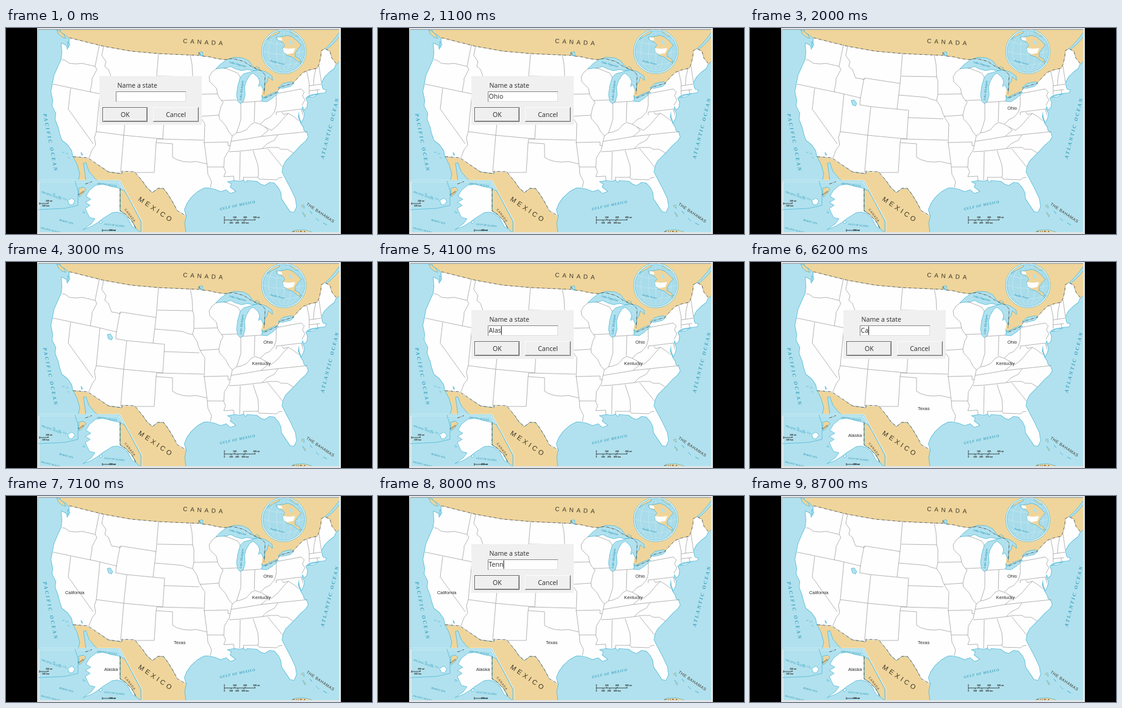
Recreate the animation shown at these times as an HTML page. Size 600x338 px, loop 8.9 s.

```html
<!DOCTYPE html>
<html lang="en">
<head>
<meta charset="utf-8">
<title>Name a state</title>
<style>
  html, body { margin: 0; width: 100%; height: 100%; overflow: hidden; background: #000; }
  svg { display: block; width: 600px; height: 338px; }
  path, circle, ellipse { fill: none; stroke-linejoin: round; }
  text { white-space: pre; }
  #usa path { fill: inherit; }
  .tan { fill: #efd59b; }
  .water { fill: #b1e1ee; }
  .white { fill: #fefefe; }
  .shore { stroke: #4fb9d8; stroke-width: .8; }
  .state { stroke: #8b8b8b; stroke-width: .65; }
  .border { stroke: #3c3a34; stroke-width: .8; stroke-dasharray: 5 1.4 1 1.4; }
  .ink { stroke: #222; stroke-width: .8; }
  .sea { font-family: "Liberation Serif", serif; font-style: italic; font-weight: bold; fill: #3a9fbf; }
  .name { font-family: "Liberation Sans", sans-serif; fill: #3a352b; }
  .tiny { font: bold 3.6px "Liberation Sans", sans-serif; fill: #222; }
  .label { font: 7.45px "Liberation Sans", sans-serif; fill: #2b2b2b; }
  #box text { font: 10.6px "Open Sans", sans-serif; fill: #2a2a2a; }
</style>
</head>
<body>
<svg viewBox="0 0 600 338">
  <defs>
    <clipPath id="frame"><rect x="53" y="3" width="493" height="332"/></clipPath>
    <clipPath id="disc"><circle cx="455.5" cy="38.5" r="34.5"/></clipPath>
    <g id="usa">
      <path d="M104 16L160 30 205 38 250 42 305 44.5 316 45 316 40 321 46 332 47 345 50 352 60 352 268 342 264 331 262 325 262 314 268 303 278 296 288 292 298 295 309 281 301 273 285 265 272 258 263 249 263 240 270 231 262 225 253 211 237 190 236 190 239 168 236 134 214 110 211 108 201 101 191 92 184 88 172 86 163 81 150 82 140 76 128 77 119 74 104 76 94 79 78 86 62 91 51 92 40 91 25 99 29 100 36 104 28z"/>
      <path d="M344 50L358 52 398 60 414 69 416 88 421 99 419 112 420 120 443 108 447 98 470 91 480 80 487 73 497 69 510 66 513 60 516 48 517 37 523 34 527 37 531 38 534 49 541 58 538 66 530 72 522 80 517 89 518 97 520 101 525 102 523 106 513 107 497 110 491 115 494 122 493 130 489 134 486 128 485 133 489 141 487 149 484 155 481 146 480 136 479 147 483 157 487 163 488 168 493 172 495 179 491 185 482 193 473 203 465 211 458 218 454 226 452 236H344z"/>
      <path d="M344 220H454L452 236 457 246 466 263 474 280 476 293 472 302 466 301 460 292 452 280 451 270 447 262 440 254 432 253 424 258 418 256 411 251 395 250 393 253 389 249 384 251 374 250 362 252 369 256 367 261 376 268 368 271 361 265 352 268 343 264z"/>
    </g>
  </defs>

  <rect width="600" height="338"/>
  <rect x="51" width="498" height="338" fill="#e3e6e8"/>
  <path d="M53 335V2.5H546" stroke="#8d979c"/>
  <g clip-path="url(#frame)">
    <rect x="53" y="3" width="493" height="332" class="water"/>
    <use href="#usa" class="shore" style="stroke-width:1.6"/>

    <!-- neighbours -->
    <path class="tan shore" d="M87 0L90 7 98 12 104 18 160 36 300 52 402 72 421 114 445 105 478 93 500 80 541 60 548 54V0z"/>
    <path class="tan shore" d="M83 3L88 5 95 11 98 17 92 15 86 10z"/>
    <path class="water shore" d="M519 37Q533 27 548 5V12Q535 30 521 38z"/>
    <path class="tan shore" d="M110 211L134 213 168 236 190 239 190 235 211 236 225 253 231 262 240 270 249 263 258 263 265 272 273 285 281 300 296 307 293 320 295 337H130L152 252 146 247 136 235 131 221 127 222 129 235 131 252 118 252 121 240 117 225z"/>
    <path class="tan shore" d="M467 337L473 332 488 331 500 334 505 337zM484 292L488 290 489 296zM486 302L491 307 490 310zM498 300L502 305zM520 320L526 323zM508 312L513 317z"/>

    <use href="#usa" class="white"/>
    <path class="white shore" d="M494 114L501 111 513 108 504 113z"/>

    <!-- lakes -->
    <path class="water shore" d="M344 67L352 59 362 52 374 48 388 49 398 54 405 63 412 69 404 70 396 68 386 70 376 67 368 63 360 66 352 66z"/>
    <path class="water shore" d="M384 81L380 95 378 110 380 120 384 124 389 121 392 110 391 97 394 87 400 77 405 74 413 81 416 88 414 96 418 93 421 100 424 104 424 93 428 88 430 80 437 86 436 79 426 72 416 69 407 70 398 73 390 75z"/>
    <path class="water shore" d="M418 120L422 115 432 109 444 104 447 106 437 115 428 121zM446 98L454 91 468 88 472 91 466 96 452 99z"/>
    <path class="water shore" d="M166 119L171 118 175 124 173 128 168 126zM123 204L126 208 124 209zM316 40L322 39 323 46 317 45zM101 22L105 27 102 32z"/>
    <path class="tan shore" d="M407 66L412 68 416 66 411 63z"/>
    <path class="shore" d="M92 204h4M98 206h4M101 212l3 2"/>

    <!-- state lines -->
    <path class="state" d="M92 52L97 53 104 58 115 59 125 58 146 63M153 28L146 63 149 68 141 83 141 88 138 105M77 92L115 100 149 107 182 115M160 30L157 45 164 55 162 63 168 68 173 82 181 83 187 85 188 82 246 91M187 82L181 115 180 126 198 129 260 135M250 42L246 91 241 133M248 79L306 80M198 129L193 176M106 99L102 133 143 190M154 108L148 170 193 176 257 182M148 170L145 180 147 192 141 200 136 213M193 176L188 237M260 135L257 182"/>
    <path class="state" d="M244 110L280 113 290 114 297 117 306 119M259 147L317 149M247 182L324 184M247 182L246 189 243 237 211 237M246 188L273 190 273 212 280 216 290 219 301 220 312 219 329 223M302 44L305 60 306 80 308 87 308 109 306 119 313 130 316 140 321 150 326 157 325 188 328 211 330 228 331 240 337 252 335 262M308 109L347 108M318 145L349 143M324 188L364 187 364 193 368 193M330 228L357 228"/>
    <path class="state" d="M346 66L338 72 333 80 334 88 345 99 347 109 350 115 356 122 352 130 349 143 350 149 360 160 365 170 371 177 369 186 366 200 358 213 357 229 360 236 357 244 373 243 374 250M353 119L379 118M357 65L370 70 380 74 384 81M385 123L385 150 381 163 378 172M371 177L378 172 384 171 394 167 402 158 408 155 417 158 425 150 432 147 440 138 443 127 443 109M387 122L418 120M408 121L407 154"/>
    <path class="state" d="M443 138L484 133M447 107L484 100 489 105 486 111 490 118 485 127M493 71L497 90 497 109M508 67L505 80 504 94M513 62L517 89M497 95L517 92M497 103L515 101M510 102L511 107M417 158L424 162 435 168 445 160 455 148 463 140 471 145 480 152M452 138L455 142 463 140M443 138L443 143M484 133L487 143M424 162L430 168 418 178M369 186L395 182 418 178 446 175 494 170M366 203L384 202 420 198"/>
    <path class="state" d="M420 198L428 190 440 184 446 175M420 198L432 196 446 196 451 199 461 199 471 205M429 198L437 208 447 220 453 228M405 201L413 225 414 240 413 245 389 245 390 250M384 203L383 250M413 245L415 248 444 249 447 246 453 245"/>

    <!-- international line -->
    <path class="border" d="M104 16L160 30 205 38 250 42 305 44.5 316 45 316 40 321 46 332 47 345 50 358 52 372 50 390 55 402 63 418 70 425 77 424 92 423 108M424 115L444 106 449 97 470 91 480 80 487 73 497 69 510 66 513 60 516 48 517 37 523 34 531 38 534 49 541 58"/>
    <path class="border" d="M110 211L134 213 168 236 190 239 190 235 211 236 225 253 231 262 240 270 249 263 258 263 265 272 273 285 281 300 295 308"/>

    <!-- insets -->
    <path class="water" d="M53 251H186L222 318V337H53z" stroke="#e8f7fa" stroke-width="3"/>
    <path class="shore" d="M53 251H186L222 318V337M113 251L118 267V291L96 296 53 298"/>
    <path class="tan shore" d="M119 263L127 261 131 265 126 272 120 277z"/>
    <path class="tan shore" d="M187 264L194 267 200 277 221 317V336L214 330 206 316 196 306 187 300z"/>
    <path class="white shore" d="M131 276L137 266 147 258 160 256 172 260 187 263 187 300 196 306 206 316 213 329 207 326 199 311 190 304 182 302 174 303 166 308 158 313 152 318 141 325 126 331 140 321 146 313 137 311 133 303 130 296 138 291 130 286 139 281z"/>
    <path class="white shore" d="M101 283L108 279 113 284 109 290 104 290zM94 279l4 1 1 2-4-1zM86 276l4 1-2 1zM77 272l3 0 0 2zM126 301l4 2-3 1zM153 318l4-2 1 3-4 2z"/>
    <path class="border" d="M187 263V300L196 306 206 316 213 329M130 256L141 252"/>

    <!-- scale bars -->
    <path class="ink" d="M358 315H409M358 312.5v5M375 313v2M392 313v2M408 313v2M369 315v2M380 315v2M390 315v2M55 288H70M55 286v4M69 286v2M158 332H180M158 330v4"/>
    <g class="tiny">
      <text x="357" y="311.5">0</text><text x="372" y="311.5">100</text><text x="389" y="311.5">200</text><text x="405" y="311.5">300 mi</text>
      <text x="357" y="321">0</text><text x="366" y="321">100</text><text x="376" y="321">200</text><text x="386" y="321">300 km</text>
      <text x="65" y="284.5">100 mi</text><text x="59" y="293">100 km</text><text x="169" y="333">200 mi</text>
    </g>
    <g id="places"></g>

    <!-- globe -->
    <circle cx="455.5" cy="38.5" r="36.5" class="shore" style="fill:#fff"/>
    <g clip-path="url(#disc)">
      <circle cx="455.5" cy="38.5" r="34.5" style="fill:#a9dcea"/>
      <g stroke="#d0edf4" stroke-width=".5">
        <ellipse cx="455.5" cy="38.5" rx="12" ry="34.5"/><ellipse cx="455.5" cy="38.5" rx="25" ry="34.5"/>
        <path d="M455.5 4V73M421 38Q455 49 490 38M425 22Q455 32 486 22M425 55Q455 66 486 55"/>
      </g>
      <path class="tan shore" d="M443 15L453 14 462 12 470 15 477 21 484 28 479 34 474 41 474 47 480 50 485 57 479 55 470 48 461 45 455 40 454 33 457 28 452 22 445 20z"/>
      <path class="tan shore" d="M428 19L436 9 449 4 448 8 438 13zM464 5L475 8 481 14 474 13zM482 55L492 56V73L483 65z"/>
      <path class="water" d="M464 20L469 21 470 27 465 26z"/>
      <path class="white" d="M454 33L464 34 474 33 471 41 466 42 461 43 455 40zM445 15L452 16 453 21 446 20z"/>
    </g>
    <circle cx="455.5" cy="38.5" r="34.5" class="shore"/>
    <text class="sea" font-size="4.2" transform="translate(433 55) rotate(14)">Pacific Ocean</text>
  </g>

  <g id="labels"></g>

  <g id="box">
    <rect x="153" y="79" width="168" height="80" fill="#f0f0f0"/>
    <text x="182.5" y="97.5">Name a state</text>
    <rect x="180" y="104" width="115" height="17" class="white"/>
    <path d="M180.5 121V104.5H295" stroke="#858585"/>
    <path d="M181 120.5H294.5V105" stroke="#dedede"/>
    <text id="typed" x="181.5" y="116.3"></text>
    <rect id="caret" y="105.5" width="1" height="14" fill="#111"/>
    <rect x="158.5" y="130.5" width="73" height="23" fill="#efefef" stroke="#686868"/>
    <path d="M160 152V131.5H230" stroke="#fff"/>
    <path d="M160 152.5H230.5V132" stroke="#9a9a9a"/>
    <text x="195.5" y="146" text-anchor="middle">OK</text>
    <path d="M241.5 153V130.5H315" stroke="#fbfbfb"/>
    <path d="M241 153.5H315.5V130" stroke="#777"/>
    <path d="M242 152.5H314.5V131" stroke="#bbb"/>
    <text x="278.5" y="146" text-anchor="middle">Cancel</text>
  </g>
</svg>
<script>
const LOOP = 8900, TICK = 100;
const $ = id => document.getElementById(id);

function addText(parent, str, attrs) {
  const el = document.createElementNS("http://www.w3.org/2000/svg", "text");
  for (const key in attrs) el.setAttribute(key, attrs[key]);
  el.textContent = str;
  return parent.appendChild(el);
}

// text, class, x, y, angle, size, letter spacing
[
  ["CANADA", "name", 290, 24.5, 3.5, 10, 4.7],
  ["MEXICO", "name", 216, 282.5, 34, 11, 4],
  ["CANADA", "name", 194, 298, 52, 5, 1],
  ["THE BAHAMAS", "name", 492, 290, 34, 6.6, .6],
  ["CUBA", "name", 469, 338, 0, 6.5, 1.5],
  ["Russia", "name", 119, 275, -35, 3.6, 0],
  ["PACIFIC OCEAN", "sea", 61, 141, 79, 8.2, 2.7],
  ["ATLANTIC OCEAN", "sea", 521, 215, -76, 8.2, 2.4],
  ["GULF OF MEXICO", "sea", 351, 299, -12, 5.8, .7],
  ["PACIFIC OCEAN", "sea", 58, 270, 20, 4.2, .2],
  ["ARCTIC OCEAN", "sea", 149, 256, 8, 4.2, .2],
  ["GULF OF ALASKA", "sea", 161, 323, 6, 4, 0],
  ["BERING SEA", "sea", 87, 316, 15, 4, 0],
  ["PACIFIC OCEAN", "sea", 57, 329, 14, 4, .1],
  ["Lake Superior", "sea", 366, 57, 16, 4.8, 0],
  ["Lake Michigan", "sea", 386, 119, -84, 5, .1]
].forEach(([str, cls, x, y, turn, size, gap]) => addText($("places"), str, {
  class: cls, "font-size": size, "letter-spacing": gap,
  transform: `translate(${x} ${y}) rotate(${turn})`
}));

// Each comma in keys is one tick; an empty entry is a pause.
const rounds = [
  { keys: "O,,h,,i,,o", open: 0, type: 300, close: 1300, show: 1500, x: 422, y: 133.5 },
  { keys: "K,e,n,t,u,ck,y", open: 2100, type: 2200, close: 2900, show: 3000, x: 403.5, y: 168.5 },
  { keys: "A,l,,a,,s,k,a", open: 3300, type: 3600, close: 4500, show: 4700, x: 161, y: 286.5 },
  { keys: "T,e,x,a,s", open: 4900, type: 5000, close: 5600, show: 5700, x: 275, y: 242.5 },
  { keys: "C,a,l,i,f,o,r,ni,a", open: 6000, type: 6100, close: 7000, show: 7100, x: 97, y: 160.5 },
  { keys: "T,,,en,,n,e,s,s,e,e", open: 7400, type: 7500, close: 8700, show: LOOP, x: 382, y: 193 }
];
for (const r of rounds) {
  r.keys = r.keys.split(",");
  r.label = addText($("labels"), r.keys.join(""), { class: "label", x: r.x, y: r.y });
}

function draw(time) {
  const t = Math.floor(time % LOOP / TICK) * TICK;
  for (const r of rounds) r.label.style.display = t >= r.show ? "" : "none";

  const r = rounds.find(r => t >= r.open && t < r.close);
  $("box").style.display = r ? "" : "none";
  if (!r) return;
  const count = Math.max(0, (t - r.type) / TICK + 1);
  const text = r.keys.slice(0, count).join("");
  $("typed").textContent = text;
  $("caret").setAttribute("x", 181.5 + (text ? $("typed").getComputedTextLength() : 0));
  $("caret").style.display = text && count <= r.keys.length ? "" : "none";
}

const start = performance.now();
function loop(now) {
  draw(Math.max(0, now - start));
  requestAnimationFrame(loop);
}
loop(start);
</script>
</body>
</html>
```
